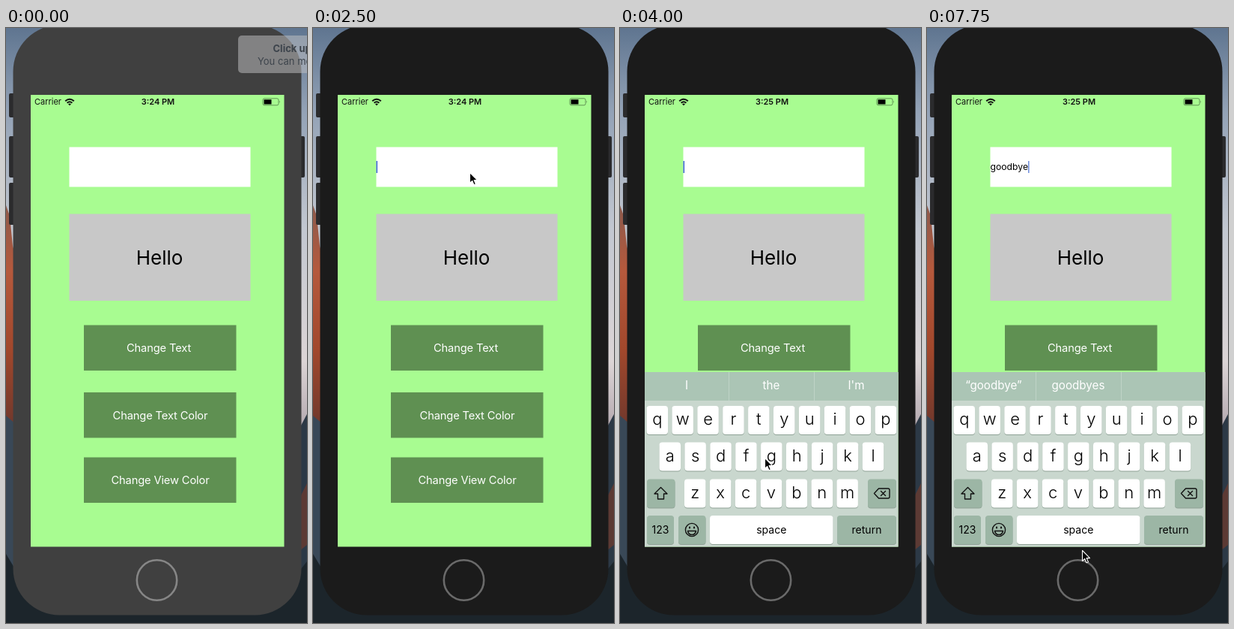
Write an HTML page that moves like this. It is 402x792 px and loops after 8000 ms.

```html
<!DOCTYPE html>
<html lang="en">
<head>
<meta charset="utf-8">
<title>Phone simulator</title>
<style>
  html, body { margin: 0; width: 100%; height: 100%; overflow: hidden; background: #26303a; }
  svg { display: block; width: 402px; height: 792px; }
  text { font-family: Inter, "Liberation Sans", sans-serif; text-anchor: middle; }
  .label { font-size: 14.7px; letter-spacing: -.01em; fill: #fff; }
  .status { font-size: 11px; fill: #111; }
  .left { text-anchor: start; }
  .key { font-size: 22px; font-weight: 300; }
  .word { font-size: 14px; }
  .hint { font-size: 15.2px; fill: #fff; }
  .icon { fill: none; stroke: #111; stroke-width: 1.4; stroke-linejoin: round; stroke-linecap: round; }
</style>
</head>
<body>
<svg viewBox="0 0 402 792">
  <defs>
    <linearGradient id="sky" x2="0" y2="1">
      <stop offset="0" stop-color="#5f7590"/>
      <stop offset=".14" stop-color="#93a2b6"/>
      <stop offset=".34" stop-color="#c3c8d1"/>
      <stop offset=".56" stop-color="#dcd5d6"/>
      <stop offset=".66" stop-color="#b9aeb4"/>
    </linearGradient>
    <linearGradient id="cliff" x2="0" y2="1">
      <stop offset="0" stop-color="#8d5a4c"/>
      <stop offset=".3" stop-color="#b5593c"/>
      <stop offset=".65" stop-color="#a2482c"/>
      <stop offset="1" stop-color="#70382c"/>
    </linearGradient>
    <clipPath id="screen"><path d="M33 89h338.5v601.5H33z"/></clipPath>
  </defs>

  <path fill="url(#sky)" d="M0 0h402v792H0z"/>
  <path fill="url(#cliff)" d="M0 236l5 14 4 40 8 30v210H0z"/>
  <path fill="#394857" d="M0 516l14 12 30 120v144H0z"/>
  <path fill="#2c3946" d="M402 514l-16 30v248h16z"/>
  <path fill="#5c3a34" d="M402 606l-10 20v70l10-8z"/>
  <path fill="#1c252b" d="M0 700l30 50 172 20 160-10 40-50v82H0z"/>

  <g id="buttons" fill="#2b2b2d">
    <rect x="4" y="87" width="8" height="32" rx="2"/>
    <rect x="4" y="144" width="8" height="55" rx="2"/>
    <rect x="4" y="206" width="8" height="56" rx="2"/>
    <rect x="391" y="144" width="8" height="55" rx="2"/>
  </g>
  <rect id="body" x="9.5" y="-4" width="385" height="785.5" rx="62"/>
  <circle id="home" cx="201.5" cy="735" r="26.7" fill="none" stroke-width="2.6"/>

  <g clip-path="url(#screen)">
    <path fill="#a8fc91" d="M33 89h339v602H33z"/>
    <text class="status left" x="38" y="102">Carrier</text>
    <g fill="none" stroke="#111" stroke-width="2">
      <path d="M79.2 97.2q5.8-5 11.6 0M81.6 99.7q3.4-2.8 6.8 0"/>
      <path fill="#111" stroke="none" d="M83 101.2q2-1.4 4 0l-2 2z"/>
    </g>
    <text id="clock" class="status" x="203" y="102" font-weight="600"></text>
    <rect x="343" y="93.8" width="21" height="9" rx="2" fill="none" stroke="#5b8a4f" stroke-width=".9"/>
    <path d="M344.5 95.2h10v6.2h-10z"/>
    <path fill="#5b8a4f" d="M365 96.7q1.6 1.5 0 3z"/>

    <path fill="#fff" d="M84.5 158.5h242v53h-242z"/>
    <text id="field" class="left" x="84.5" y="189" font-size="12.2"></text>
    <rect id="caret" y="177" width="1.6" height="16" fill="#3c66d0"/>
    <path fill="#c8c8c8" d="M84.5 247.5h242V363h-242z"/>
    <text x="205" y="315" font-size="26">Hello</text>

    <path fill="#5f9052" d="M104 395.5h203.500v60.500H104zM104 485h203.500v60.500H104zM104 571.500h203.500V632H104z"/>
    <text class="label" x="204" y="431">Change Text</text>
    <text class="label" x="206" y="521">Change Text Color</text>
    <text class="label" x="206" y="607">Change View Color</text>

    <g id="board">
      <path fill="#c9d7ce" d="M33 458h339v234H33z"/>
      <path fill="#abc5b5" d="M33 458h339v38H33z"/>
      <path stroke="#bfd3c6" d="M145.500 458v38M259.500 458v38"/>
      <g id="hints"></g>
      <g id="keys"></g>
      <path class="icon" d="M54.500 611.500l-8.500 8.500h4.500v7h8v-7h4.500z"/>
      <path class="icon" d="M339.500 619.500l6-6.500h12.500q2 0 2 2v9q0 2-2 2h-12.500zM348.500 616.500l6 6m0-6l-6 6"/>
      <g class="icon" stroke-width="1.2">
        <circle cx="96" cy="668" r="8.600"/>
        <path d="M90.500 669.500h11q-1 5-5.500 5t-5.500-5z"/>
        <path stroke-width="2" d="M93 664.500v1M99 664.500v1"/>
      </g>
    </g>
  </g>

  <g id="note">
    <rect x="310" y="10" width="120" height="50" rx="5" fill="#c4c4c6" fill-opacity=".5"/>
    <g fill="#3d444c" font-size="13">
      <text class="left" x="356.500" y="32" font-weight="700">Click upd</text>
      <text class="left" x="336" y="49">You can mov</text>
    </g>
  </g>
  <path id="pointer" fill="#000" stroke="#fff" stroke-width="1.100" stroke-linejoin="round"
    d="M.500.500v14l3.200-3 2.300 5.200 2.400-1-2.300-5.100h4.400z"/>
</svg>

<script>
const STEP = 250, LOOP = 8000;
const $ = id => document.getElementById(id);
const NS = 'http://www.w3.org/2000/svg';

function add(parent, tag, attrs, text = '') {
  const el = document.createElementNS(NS, tag);
  for (const k in attrs) el.setAttribute(k, attrs[k]);
  el.textContent = text;
  return parent.appendChild(el);
}

function key(x, y, w, label, cls, fill = '#fff') {
  const box = { x, width: w, height: 38, rx: 4 };
  add($('keys'), 'rect', { ...box, y: y + 1, fill: '#8fa296' });
  add($('keys'), 'rect', { ...box, y, fill });
  add($('keys'), 'text', { x: x + w / 2, y: y + (cls === 'key' ? 25 : 23.500), class: cls }, label);
}

[['qwertyuiop', 35.500, 503], ['asdfghjkl', 52.500, 551.500], ['zxcvbnm', 86, 600.500]]
  .forEach(([row, x, y]) => [...row].forEach((c, i) => key(x + i * 33.900, y, 28.500, c, 'key')));
const DARK = '#9cb6a5';
key(36, 600.500, 37.500, '', 'word', DARK);
key(331, 600.500, 38, '', 'word', DARK);
key(36, 649, 36, '123', 'word', DARK);
key(78, 649, 36.500, '', 'word', DARK);
key(120, 649, 164.500, 'space', 'word');
key(290, 649, 79, 'return', 'word', DARK);

const hints = [89, 202, 315.500].map(x => add($('hints'), 'text', { x, y: 481, class: 'hint' }));

// Each track lists [start ms, value]; the value holds until the next start.
const tracks = {
  focus: [[0, 0], [500, .5], [750, 1]],
  note: [[0, 1], [250, .6], [500, .2], [750, 0]],
  clock: [[0, '3:24 PM'], [2750, '3:25 PM']],
  caret: [[0, 0], [1500, 1], [1750, .6], [2000, 0], [2250, .5], [2500, 1],
    [3500, 0], [3750, .6], [4000, 1], [4500, 0], [4750, .6], [5000, 1], [7750, .7]],
  drop: [[0, 240], [2750, 90], [3000, 2], [3250, 0]],
  pointer: [[0, null], [750, [214, 215]], [1000, [209, 192]], [3500, [208, 420]], [3750, [203, 629]],
    [4000, [193, 572]], [4500, [228, 556]], [4750, [263, 540]], [7500, [232, 632]], [7750, [207, 695]]],
  typed: [[0, ''], [5000, 'g'], [5500, 'go'], [5750, 'goo'], [6000, 'good'],
    [6750, 'goodb'], [7250, 'goodby'], [7750, 'goodbye']],
  hints: [[0, ['I', 'the', 'I\'m']], [5000, ['“g”', 'good', 'got']], [5500, ['“go”', 'good', 'going']],
    [5750, ['“goo”', 'good', 'goo']], [6000, ['“good”', 'goods', 'goody']],
    [6750, ['“goodb”', 'goodbye', 'goodbyes']], [7250, ['“goodby”', 'goodbye', 'goodbyes']],
    [7750, ['“goodbye”', 'goodbyes', '']]]
};

const at = (name, t) => tracks[name].filter(([start]) => start <= t).pop()[1];
const gray = v => `rgb(${v},${v},${v})`;

function draw(now) {
  const t = Math.floor(now % LOOP / STEP) * STEP;
  const focus = at('focus', t), pos = at('pointer', t);
  $('body').setAttribute('fill', gray(64 - 37 * focus));
  $('home').setAttribute('stroke', gray(134 - 28 * focus));
  $('note').setAttribute('opacity', at('note', t));
  $('clock').textContent = at('clock', t);
  $('field').textContent = at('typed', t);
  $('caret').setAttribute('x', 84.500 + $('field').getComputedTextLength());
  $('caret').setAttribute('opacity', at('caret', t));
  $('board').setAttribute('transform', `translate(0 ${at('drop', t)})`);
  at('hints', t).forEach((word, i) => hints[i].textContent = word);
  $('pointer').setAttribute('visibility', pos ? 'visible' : 'hidden');
  if (pos) $('pointer').setAttribute('transform', `translate(${pos})`);
}

function tick(now) {
  draw(now);
  requestAnimationFrame(tick);
}
draw(0);
requestAnimationFrame(tick);
</script>
</body>
</html>
```
